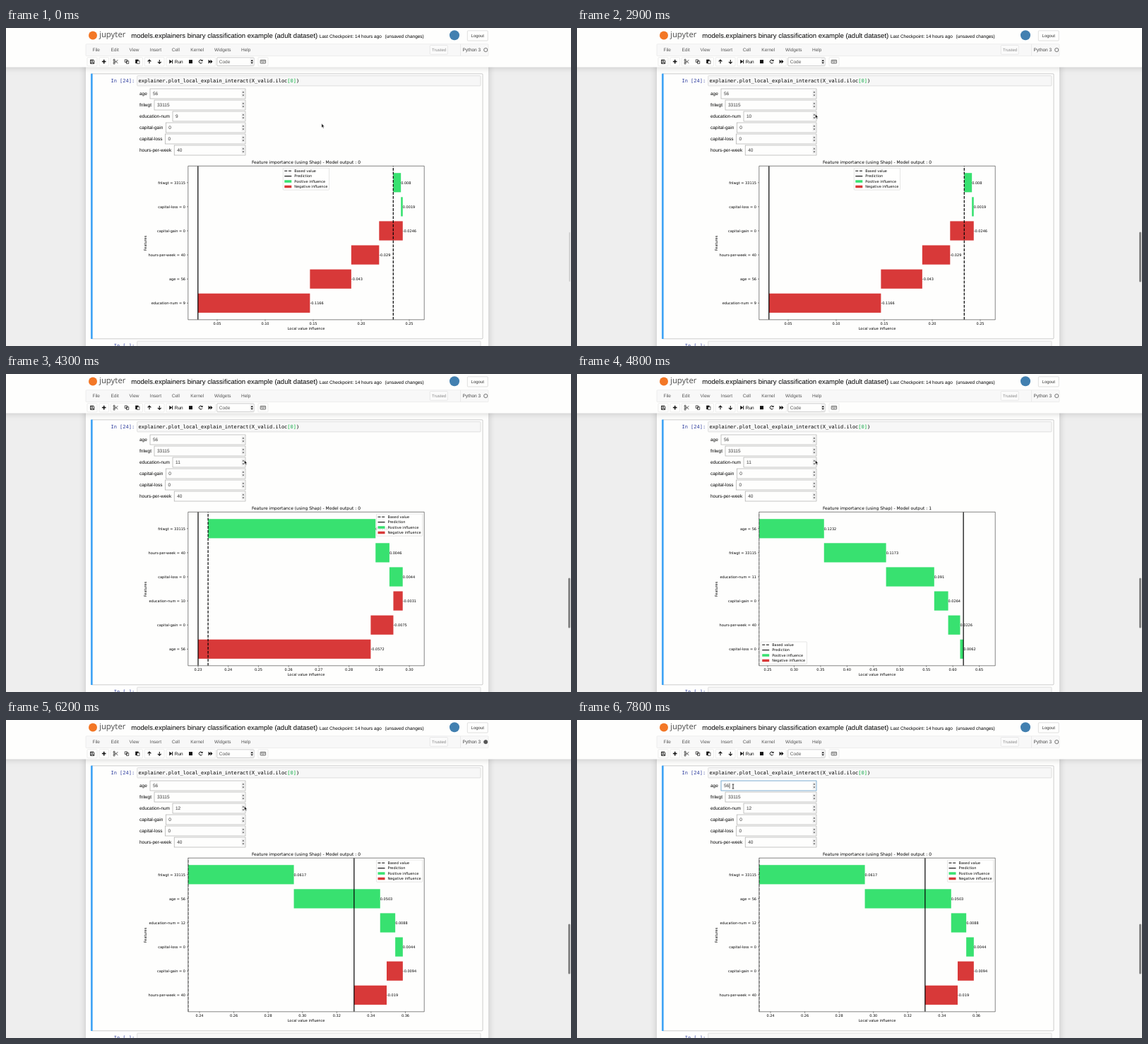
Write an HTML page that moves like this. It is 800 px wide and 450 px high and loops after 8 s.

```html
<!DOCTYPE html>
<html lang="en">
<head>
<meta charset="utf-8">
<title>Notebook explainer</title>
<style>
html, body { margin: 0; width: 100%; height: 100%; overflow: hidden; background: #eee; }
svg { display: block; width: 800px; height: 450px; font: 6.5px "Liberation Sans", sans-serif; text-rendering: geometricPrecision; }
.plot { font-family: "DejaVu Sans", sans-serif; }
.code { font: 7px "DejaVu Sans Mono", monospace; white-space: pre; }
.brand { font: 11.4px "Open Sans", sans-serif; }
.shadow { filter: drop-shadow(0 0 5px rgba(87, 87, 87, .3)); }
</style>
</head>
<body>
<svg viewBox="0 0 800 450">
  <clipPath id="axes"><rect x="257.8" y="195.3" width="334.4" height="217.5"/></clipPath>
  <g id="page"></g>
  <g id="chart" class="plot"></g>
  <g id="live"></g>
</svg>
<script>
const LOOP = 8000, GREEN = '#38e170', RED = '#d83939', PAPER = '#fefefd', INK = '#111';
const byId = id => document.getElementById(id);

const text = (x, y, s, attrs = '') => `<text x="${x}" y="${y}" ${attrs}>${s}</text>`;
const rect = (x, y, w, h, fill, attrs = '') =>
  `<rect x="${x}" y="${y}" width="${w}" height="${h}" fill="${fill}" ${attrs}/>`;
const box = (x, y, w, h, stroke = '#ccc', fill = PAPER, r = 1) =>
  rect(x, y, w, h, fill, `stroke="${stroke}" stroke-width=".6" rx="${r}"`);
const path = (d, attrs = '') => `<path d="${d}" ${attrs}/>`;
const line = (d, width, color = INK, attrs = '') =>
  path(d, `fill="none" stroke="${color}" stroke-width="${width}" ${attrs}`);

// Form fields: label, left edge, value
const fields = [
  ['age', 204, '56'], ['fnlwgt', 210, '33115'], ['education-num', 236, ''],
  ['capital-gain', 226.3, '0'], ['capital-loss', 225.6, '0'], ['hours-per-week', 238.2, '40']
];
const fieldY = i => 93 + i * 16;

function header() {
  const menus = { File: 122.5, Edit: 148.5, View: 174.5, Insert: 203.7, Cell: 234.8, Kernel: 261.3, Widgets: 295, Help: 333 };
  return rect(-10, -10, 820, 65.5, PAPER, 'class="shadow"')
    + '<circle cx="123" cy="10.5" r="6" fill="#f37726"/>'
    + text(132, 13, 'jupyter', 'class="brand" fill="#4e4e4e"')
    + text(177.3, 13.8, 'models.explainers binary classification example (adult dataset)', 'font-size="9.52"')
    + text(443.8, 13.8, 'Last Checkpoint: 14 hours ago')
    + text(536.5, 13.8, '(unsaved changes)')
    + '<circle cx="635" cy="10.3" r="7" fill="#4280b0"/>'
    + box(653.3, 3.8, 28.9, 14.2)
    + text(667.8, 13, 'Logout', 'font-size="6" text-anchor="middle" fill="#333"')
    + box(113, 22.7, 570, 16.8, '#e4e4e4', '#f8f8f8')
    + Object.entries(menus).map(([name, x]) => text(x, 33.3, name, 'fill="#555"')).join('')
    + box(600.3, 24.5, 25, 12.8, '#ddd', '#fbfbfb')
    + text(613, 33, 'Trusted', 'font-size="6" text-anchor="middle" fill="#888"')
    + line('M643.5 23V39', .5, '#ddd')
    + text(646.5, 33.3, 'Python 3', 'fill="#444"');
}

function toolbar() {
  const groups = [[115, 14], [132, 13.5], [148.3, 45.2], [196.3, 27.8], [227, 69.5], [357, 14]];
  const arrow = (x, dir) => line(`M${x} ${47.6 - 2.6 * dir}V${47.6 + 2.6 * dir}M${x - 2.4} ${47.6 + .2 * dir}l2.4 ${2.4 * dir}l2.4 ${-2.4 * dir}`, 1.1);
  const play = (x, w) => path(`M${x} 44.8l${w} 2.8l${-w} 2.8z`);
  return groups.map(([x, w]) => box(x, 41.6, w, 12.2, '#e2e2e2')).join('')
    + line('M119.5 45h4.2l1.2 1.2v4.2h-5.4zM120.8 45v1.8h2.2V45M120.8 50.4v-2h2.8v2', .8)
    + line('M138.7 44.8v5.6M135.9 47.6h5.6', 1.5)
    + line('M153.8 46.2L158.4 49.8M153.8 49L158.4 45.4M152.2 45.6a1 1 0 1 0 1.8 0a1 1 0 1 0 -1.8 0M152.2 49.6a1 1 0 1 0 1.8 0a1 1 0 1 0 -1.8 0', .7)
    + line('M168.3 44.8h3.2v3.6h-3.2zM170.4 46.6h3.3v3.8h-3.3z', .7)
    + rect(183.2, 44.6, 4.4, 5.4, INK) + box(185.6, 46.5, 3.4, 4.1, INK, PAPER, 0)
    + arrow(203, -1) + arrow(217.3, 1)
    + play(231.3, 3.8) + rect(235.2, 44.9, 1, 5.4, INK)
    + text(238.7, 50, 'Run')
    + rect(259, 45.1, 5, 5, INK)
    + line('M277.7 46.2A2.4 2.4 0 1 0 277.9 48.5', 1) + path('M278.5 44.6v2.5h-2.5z')
    + play(286.6, 3) + play(289.5, 3)
    + box(298.7, 41.8, 52.4, 11.8, '#aaa') + text(301.8, 50.2, 'Code', 'fill="#555"')
    + rect(345.5, 42.2, 5.2, 11, '#eee') + path('M346.5 46.9l1.7 -2l1.7 2zM346.5 48.4l1.7 2l1.7 -2z')
    + box(360.2, 45.3, 7.4, 4.7, INK, PAPER, .5)
    + line('M361.4 46.6h5.2M361.4 47.7h5.2M362.5 48.8h3', .6, INK, 'stroke-dasharray=".7 .4"');
}

function notebook() {
  const prompt = (y, s) => text(182.2, y, s, 'class="code" fill="#303f9f" text-anchor="end"');
  const spinner = y => rect(333.5, y - 5, 4.6, 10, '#eee')
    + path(`M334.5 ${y - 1.6}l1.4 -1.7l1.4 1.7zM334.5 ${y + 1.6}l1.4 1.7l1.4 -1.7z`, 'fill="#444"');
  return rect(113, -20, 570, 500, PAPER, 'class="shadow"')
    + box(120.5, 64.8, 554.5, 375, '#ababab') + rect(120, 64.6, 2.7, 375.4, '#42a5f5')
    + prompt(76.8, 'In [24]:') + box(185.7, 67.6, 486.3, 14.3, '#cfcfcf', '#f7f7f7')
    + text(187.6, 76.8, 'explainer.plot_local_explain_interact(X_valid.iloc<tspan fill="#0b3">[</tspan><tspan fill="#2a5">0</tspan><tspan fill="#0b3">]</tspan>)', 'class="code"')
    + prompt(452.4, 'In [ ]:') + box(185.7, 443.2, 486.3, 14, '#cfcfcf', '#f7f7f7')
    + fields.map(([label, x, value], i) => {
      const y = fieldY(i);
      return text(189, y + 2.3, label) + box(x, y - 7, 339 - x, 14, '#9e9e9e', PAPER, 0)
        + text(x + 4, y + 2.4, value, 'fill="#333"') + spinner(y);
    }).join('');
}

// ticks: first, step, count, x of the first, pixels per unit
const BASE = .2333;
const charts = [
  { from: 0, output: 0, ticks: [.05, .05, 5, 299, 1360], legend: [392.3, 198],
    rows: [['fnlwgt = 33115', .008], ['capital-loss = 0', .0019], ['capital-gain = 0', -.0246],
      ['hours-per-week = 40', -.029], ['age = 56', -.043], ['education-num = 9', -.1166]] },
  { from: 3400, output: 0, ticks: [.23, .01, 8, 272, 4273], legend: [524.5, 198],
    rows: [['fnlwgt = 33115', .0555], ['hours-per-week = 40', .0046], ['capital-loss = 0', .0044],
      ['education-num = 10', -.0031], ['capital-gain = 0', -.0075], ['age = 56', -.0572]] },
  { from: 4800, output: 1, ticks: [.25, .05, 9, 270, 749], legend: [260.2, 379],
    rows: [['age = 56', .1232], ['fnlwgt = 33115', .1173], ['education-num = 11', .091],
      ['capital-gain = 0', .0264], ['hours-per-week = 40', .0226], ['capital-loss = 0', .0062]] },
  { from: 6200, output: 0, ticks: [.24, .02, 7, 274, 2429], legend: [524.5, 198],
    rows: [['fnlwgt = 33115', .0617], ['age = 56', .0503], ['education-num = 12', .0088],
      ['capital-loss = 0', .0044], ['capital-gain = 0', -.0094], ['hours-per-week = 40', -.019]] }
];

function legend([x, y]) {
  const names = ['Based value', 'Prediction', 'Positive influence', 'Negative influence'];
  return rect(x, y, 65.2, 31.2, '#fff', 'fill-opacity=".8" stroke="#ccc" stroke-width=".5" rx="1"')
    + names.map((name, i) => {
      const rowY = y + 4.2 + i * 7.45;
      const key = i > 1 ? rect(x + 2, rowY - 1.8, 10, 3.5, i == 2 ? GREEN : RED)
        : line(`M${x + 2} ${rowY}h10`, 1.1, '#000', i ? '' : 'stroke-dasharray="4 1.7"');
      return key + text(x + 16, rowY + 1.8, name, 'font-size="5"');
    }).join('');
}

function drawChart({ output, ticks: [first, step, count, x0, scale], legend: place, rows }) {
  const xOf = v => x0 + (v - first) * scale;
  let bars = '', labels = '', marks = '', total = BASE;
  rows.forEach(([name, value], i) => {
    const y = 218.8 + i * 34.1, next = total + value;
    const left = xOf(Math.min(total, next)), right = xOf(Math.max(total, next));
    bars += rect(left, y - 13.6, right - left, 27.2, value > 0 ? GREEN : RED);
    labels += text(right, y + 1.8, value) + text(254, y + 1.8, name, 'text-anchor="end"');
    marks += `M257.8 ${y}h-1.8`;
    total = next;
  });
  for (let i = 0; i < count; i++) {
    const v = first + i * step;
    marks += `M${xOf(v)} 412.8v1.8`;
    labels += text(xOf(v), 420.2, v.toFixed(2), 'text-anchor="middle"');
  }
  return text(425, 192, `Feature importance (using Shap) - Model output : ${output}`, 'font-size="6" text-anchor="middle"')
    + `<g clip-path="url(#axes)">${bars}`
    + line(`M${xOf(BASE)} 412.8V195.3`, 1.2, '#000', 'stroke-dasharray="4 1.7"')
    + line(`M${xOf(total)} 412.8V195.3`, 1.2, '#000') + '</g>'
    + line(marks + 'M257.8 195.3h334.4v217.5h-334.4z', .55, '#222')
    + `<g font-size="5">${labels}`
    + text(425, 427.2, 'Local value influence', 'text-anchor="middle"')
    + text(0, 0, 'Features', 'text-anchor="middle" transform="translate(198.7 304.5) rotate(-90)"') + '</g>'
    + legend(place);
}

// Pointer moves: start time, number of 100 ms steps, end point
const start = [446.9, 135.3];
const moves = [
  [1500, 5, [337, 112.5]], [2100, 6, [337.5, 122]],
  [6600, 6, [229, 91.5]], [7700, 2, [221, 94]]
];

function pointerAt(t) {
  let pos = start;
  for (const [begin, steps, end] of moves) {
    if (t < begin) break;
    const k = Math.min(1, (Math.floor((t - begin) / 100) + 1) / steps);
    pos = pos.map((p, i) => p + (end[i] - p) * k);
  }
  return pos;
}

function drawPointer([x, y]) {
  const overField = fields.some(([, left], i) => x > left && x < 333 && Math.abs(y - fieldY(i)) < 7);
  return `<g transform="translate(${x} ${y})">` + (overField
    ? line('M-1.3 -3h2.6M0 -3v6M-1.3 3h2.6', .8)
    : path('M0 0V5.7L1.3 4.5L2.2 6.7L3.1 6.3L2.2 4.2H3.9Z', 'fill="#111" stroke="#fff" stroke-width=".4"')) + '</g>';
}

function drawLive(t) {
  const education = 9 + [2900, 4300, 5700].filter(at => t >= at).length;
  const busy = (t >= 3400 && t < 4300) || (t >= 6200 && t < 6600);
  const focus = t >= 7400;
  return text(240, fieldY(2) + 2.4, education, 'fill="#333"')
    + `<circle cx="679.2" cy="31" r="2.6" fill="${busy ? '#555' : 'none'}" stroke="#555" stroke-width=".8"/>`
    + (t < 1000 ? rect(797, 289, 2, 70, '#d2d2d2', 'rx="1"') : rect(796, 288.5, 3, 71, '#858585', 'rx="1.5"'))
    + (focus ? box(204, 86, 135, 14, '#64b5f6', 'none', 0) + line('M216 89.4v7.6', .6) : '')
    + drawPointer(pointerAt(t));
}

byId('page').innerHTML = notebook() + header() + toolbar();
let shownChart, shownLive;

function frame() {
  const t = performance.now() % LOOP;
  const chart = charts.findLast(c => t >= c.from);
  if (chart !== shownChart) byId('chart').innerHTML = drawChart(shownChart = chart);
  const live = drawLive(t);
  if (live !== shownLive) byId('live').innerHTML = shownLive = live;
  requestAnimationFrame(frame);
}
frame();
</script>
</body>
</html>
```
